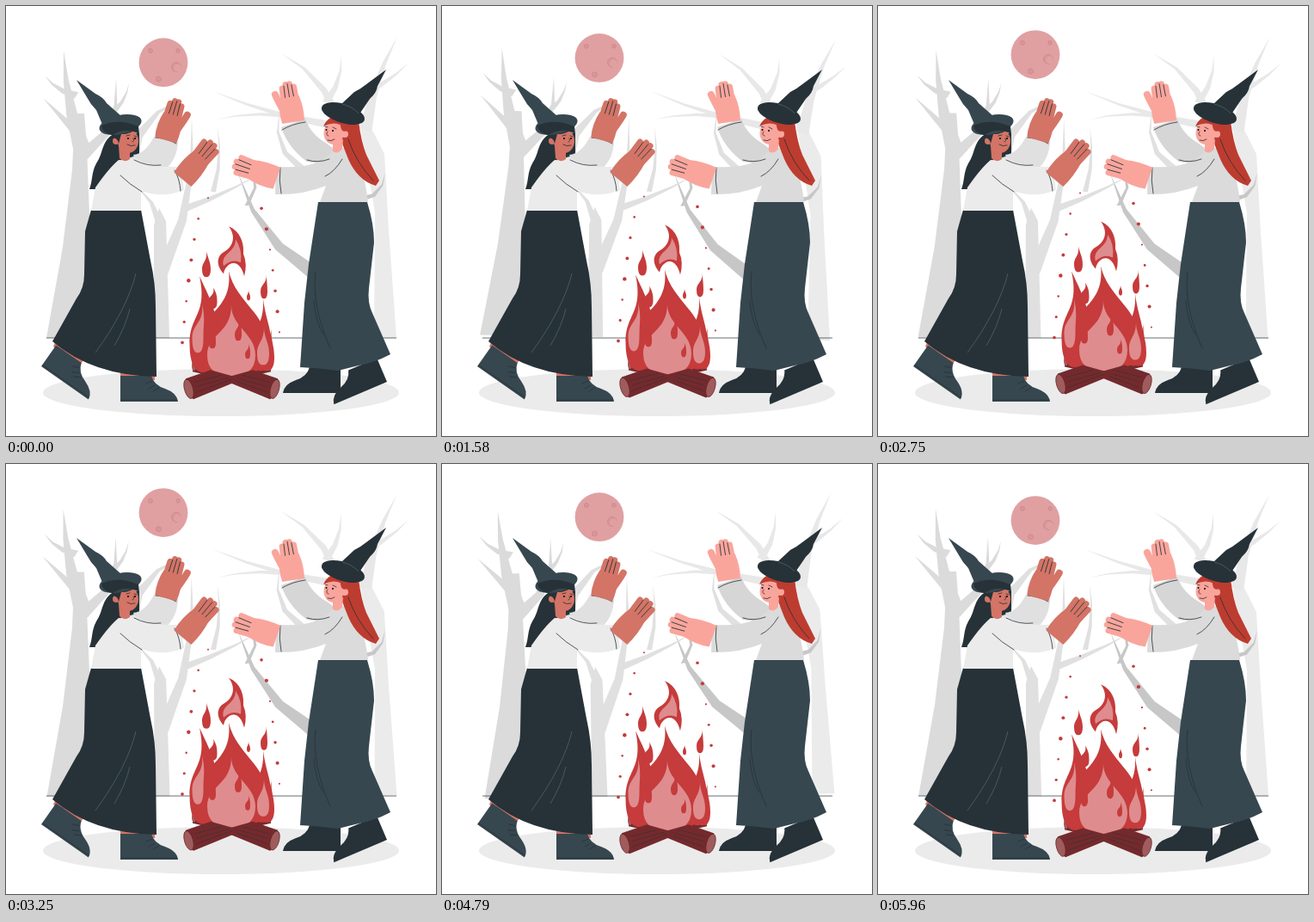
These frames come from a looping animation (500 by 500 pixels, 6000 ms). An HTML page:

```html
<!DOCTYPE html>
<html lang="en">
<head>
<meta charset="utf-8">
<title>Witches at the fire</title>
<style>
html, body { margin: 0; width: 100%; height: 100%; overflow: hidden; background: #fff; }
svg { display: block; width: 100vw; height: 100vh; }
.line { fill: none; stroke: #263238; stroke-width: .8; stroke-linecap: round; }
.soft { fill: none; stroke: #50626b; stroke-width: .8; }
.red { fill: #c63b3b; }
.pink { fill: #df8c8e; }
.wood { fill: #742a2d; }
.hair { fill: #bd3c30; }
.tan { fill: #d37466; }
.peach { fill: #faa59c; }
.night { fill: #263238; }
.slate { fill: #37474f; }
</style>
</head>
<body>
<svg viewBox="0 0 500 500">
  <defs>
    <g id="boot">
      <path d="M0 0V-30H36Q39 -19 52 -15Q66 -10 67 0Z"/>
      <path class="line" d="M37 -24L30 -21M40 -19L33 -15M45 -16L38 -12M1 -2H66"/>
    </g>
    <g id="backLog">
      <path class="wood" d="M217 414Q222 409 229 412L262 427V436L217 426Z"/>
      <ellipse cx="218.5" cy="419" rx="2.5" ry="6" fill="#a05b5d"/>
    </g>
    <g id="log">
      <path class="wood" d="M209 434L238 424L263 431L274 435L218 458Q206 451 209 434Z"/>
      <path class="line" d="M219 438L250 430M222 443L258 433M221 450L262 435" stroke-opacity=".6"/>
      <ellipse cx="212.5" cy="446" rx="5" ry="11.5" transform="rotate(-16 212.5 446)" fill="#a05b5d" stroke="#5c2225" stroke-width=".7"/>
    </g>
  </defs>

  <g id="trees"></g>
  <path d="M47 386H454" stroke="#263238" stroke-width=".7"/>

  <g id="moon" fill="#d99597" stroke="#c98488" stroke-width=".7">
    <circle cx="183" cy="65.7" r="28.4" fill="#e0a0a2" stroke="none"/>
    <circle cx="198" cy="71" r="5.5"/><circle cx="177.5" cy="85" r="3"/>
    <circle cx="200" cy="52" r="2.3"/><circle cx="168" cy="52" r="2.5"/>
    <circle cx="199.5" cy="72" r="4.5" fill="#e0a0a2" stroke="none"/>
  </g>

  <ellipse cx="250" cy="449.5" rx="207" ry="27.5" fill="#ebebeb"/>

  <g id="fire">
    <use href="#backLog"/><use href="#backLog" transform="translate(525) scale(-1 1)"/>
    <g id="flames"></g>
    <path class="red" d="M259 257C273 263 277 277 276 289Q281 301 277 315C274 302 267 297 260 301Q254 305 253 312C244 302 245 292 253 287C264 281 268 269 259 257Z"/>
    <path class="pink" d="M267 272Q275 284 273 299Q263 294 253 303C249 288 267 288 267 272Z"/>
    <use href="#log" transform="translate(525) scale(-1 1)"/><use href="#log"/>
  </g>

  <g id="darkWitch">
    <path class="night" d="M126 148C110 158 114 170 105 183C99 194 101 203 97 213H106C116 206 119 191 131 180L155 173V148Z"/>
    <path class="tan" d="M58 389L90 412L84 420L55 396ZM133 426H173V435H133Z"/>
    <use href="#boot" class="slate" transform="translate(41 419) rotate(35)"/>
    <use href="#boot" class="slate" transform="translate(133 460)"/>
    <path class="night" d="M99 237H157L168 296Q174 322 174 350L175 431Q101 430 54 390L82 340Q91 328 91 312L92 262Z"/>
    <path class="soft" d="M151 311Q141 352 104 403M144 352Q139 373 126 395"/>
    <path fill="#e0e0e0" d="M148 173Q162 172 172 152L200 157Q199 179 185 190L155 192Z"/>
    <path fill="#ebebeb" d="M131 179Q143 181 149 176Q162 188 203 187L207 214Q182 224 157 215V238H99L104 211Q120 188 131 179Z"/>
    <path class="line" d="M133 197Q143 207 158 216M149 179Q164 187 180 185M174 153Q187 154 198 160M196 191Q202 201 203 215"/>
    <path class="tan" d="M131 162L144 167V178Q137 183 132 177Z"/>
    <ellipse class="tan" cx="142" cy="157" rx="12" ry="14"/>
    <circle class="tan" cx="128" cy="157" r="4"/>
    <path class="night" d="M123 153Q130 138 154 142Q142 150 134 149L131 160Q130 153 123 153Z"/>
    <path class="line" d="M140 151L144 150M149 151L152 152M148 154Q150 157 147 158M141 161Q145 164 150 162"/>
    <circle cx="142" cy="154" r="1"/><circle cx="150" cy="154" r="1"/>
    <path class="slate" d="M82 86L104 102Q113 106 117 113L134 128L113 140L105 121Q98 114 94 106Z"/>
    <ellipse class="slate" cx="133" cy="138" rx="25" ry="11" transform="rotate(-12 133 138)"/>
    <path class="night" d="M111 139Q130 130 154 140L155 149Q140 140 124 150Q112 148 111 139Z"/>
  </g>

  <g id="redWitch">
    <use href="#boot" class="night" transform="translate(389 450) scale(-1 1)"/>
    <use href="#boot" class="night" transform="translate(443 437) rotate(-23) scale(-1 1)"/>
    <path class="slate" d="M363 228H420Q428 254 428 275L422 328Q420 345 426 357L447 405Q428 415 410 418L386 424Q364 421 342 420L347 345L352 300Z"/>
    <path class="line" d="M360 309Q355 348 377 398M358 343Q360 368 369 382"/>
    <path fill="#d6d6d6" d="M320 141L348 131Q354 149 373 160L388 171L377 185L350 181Q328 165 320 141Z"/>
    <path fill="#dbdbdb" d="M381 168Q390 161 400 169Q416 184 421 228H365L372 209Q345 220 313 219L314 187Q348 189 367 180Z"/>
    <path class="line" d="M321 144Q333 137 348 135M319 188Q317 203 320 218M391 178Q382 193 371 198M350 179Q363 183 376 178"/>
    <path class="hair" d="M384 128L410 134Q413 158 419 173L434 203L430 209Q409 203 398 178L389 155Z"/>
    <path class="line" d="M398 155Q407 182 427 203"/>
    <path class="peach" d="M380 157L392 155L391 166Q386 173 380 169Z"/>
    <ellipse class="peach" cx="381" cy="148" rx="11.5" ry="13"/>
    <circle class="peach" cx="394" cy="149" r="4"/>
    <path class="hair" d="M369 140Q377 122 402 130L404 147L397 145Q389 148 389 138Q379 134 369 140Z"/>
    <path class="line" d="M371 140L374 141M380 141L384 143M374 146Q371 150 375 151M374 156Q378 158 382 155"/>
    <circle cx="372.5" cy="144" r="1"/><circle cx="380" cy="145" r="1"/>
    <path class="night" d="M442 74L432 93Q431 101 423 108L408 130L380 117L391 113L405 100Q413 96 419 91Z"/>
    <ellipse class="night" cx="392" cy="125" rx="26" ry="11" transform="rotate(17 392 125)"/>
    <path class="soft" d="M391 114Q403 117 410 125"/>
  </g>
</svg>
<script>
const byId = id => document.getElementById(id);
const trees = byId('trees'), moon = byId('moon'), fire = byId('fire'), flames = byId('flames');

function add(parent, tag, attrs) {
  const el = document.createElementNS('http://www.w3.org/2000/svg', tag);
  for (const key in attrs) el.setAttribute(key, attrs[key]);
  parent.append(el);
  return el;
}

// A kinked branch from root to tip, thinning to a point; bend pushes it sideways.
function limb(fill, width, x, y, tipX, tipY, bend) {
  const dx = tipX - x, dy = tipY - y, len = Math.hypot(dx, dy);
  const edge = side => [0, .35, .7, 1].map(t => {
    const off = bend * Math.min(3 * t, 1, 3 * (1 - t)) + side * width / 2 * (1 - t);
    return [x + dx * t - dy / len * off, y + dy * t + dx / len * off];
  });
  add(trees, 'polygon', { fill, points: edge(1).concat(edge(-1).reverse()).join(' ') });
}

const trunk = (fill, d) => add(trees, 'path', { fill, d });
const pale = '#e8e8e8', light = '#e0e0e0', mid = '#dbdbdb', dark = '#c7c7c7';

trunk('#ebebeb', 'M428 386L429 240L407 112L429 150L440 172L445 260L454 386Z');
limb(pale, 15, 418, 145, 455, 36, -5);
limb(pale, 8, 417, 101, 468, 66, 3);
limb(pale, 11, 386, 130, 320, 55, 9);
limb(pale, 9, 372, 112, 390, 58, 5);
limb(pale, 9, 375, 138, 240, 99, -4);
limb(pale, 5, 322, 127, 245, 132, 3);
limb(light, 9, 345, 190, 318, 122, -12);
limb(dark, 17, 360, 312, 270, 195, -14);
limb(dark, 5, 280, 232, 274, 176, 12);
limb(dark, 7, 410, 225, 441, 193, 9);

trunk(light, 'M172 386L172 255L178 235L186 250L190 386Z');
limb(light, 14, 179, 290, 150, 207, 12);
limb(light, 15, 181, 310, 216, 130, 12);
limb(light, 8, 207, 236, 292, 197, 2);
limb(light, 6, 241, 216, 246, 140, 4);
limb(light, 15, 145, 185, 205, 108, -14);

trunk(mid, 'M47 386L66 280L77 190L80 125L91 125L94 165L98 270L93 386Z');
limb(mid, 20, 88, 165, 67, 52, -4);
limb(mid, 9, 82, 104, 45, 81, -4);
limb(mid, 11, 85, 150, 43, 107, 0);
limb(mid, 15, 88, 175, 128, 85, 14);
limb(mid, 6, 126, 122, 143, 90, 3);

// A teardrop flame standing on (x, y) with a tip that leans by bend.
function tongue(kind, x, y, width, tipX, tipY, bend) {
  const h = y - tipY, r = width / 2, belly = y - h * .3;
  add(flames, 'path', {
    class: kind,
    d: `M${tipX} ${tipY}C${tipX + bend} ${tipY + h * .3} ${x + r} ${y - h * .6} ${x + r} ${belly}
      Q${x + r} ${y} ${x} ${y}Q${x - r} ${y} ${x - r} ${belly}
      C${x - r} ${y - h * .6} ${tipX + bend * .6} ${tipY + h * .4} ${tipX} ${tipY}Z`
  });
}

tongue('red', 262, 433, 84, 259, 309, 9);
tongue('red', 230, 427, 33, 225, 315, 16);
tongue('red', 297, 425, 24, 299, 341, 3);
tongue('red', 303, 425, 18, 309, 373, -2);
tongue('pink', 262, 431, 56, 262, 349, 0);
tongue('pink', 223, 404, 13, 228, 347, 4);
tongue('pink', 299, 418, 14, 300, 374, 0);
tongue('red', 270, 390, 8, 270, 366, 4);
tongue('red', 240, 399, 8, 241, 377, 3);
tongue('red', 281, 411, 6, 282, 394, 2);
tongue('red', 233, 316, 10, 233, 286, 2);
tongue('red', 300, 341, 8, 303, 313, 0);
tongue('red', 240, 353, 11, 241, 328, 4);
tongue('red', 282, 343, 4, 282, 331, 0);

// Sparks fall on alternate sides of a column that widens downwards.
for (let i = 0; i < 15; i++) {
  const side = i % 2 ? 1 : -1, vary = i * .618 % 1;
  add(flames, 'circle', {
    class: 'red', r: 1 + 1.3 * vary,
    cx: 262 + side * (27 + 30 * Math.sqrt(i / 14)), cy: 224 + 12 * i
  });
}

// A hand at the wrist (x, y), pointing along angle; thumb is -1, 0 or 1 for its side.
function hand(owner, skin, x, y, angle, len, thumb) {
  const g = add(byId(owner), 'g', {
    transform: `translate(${x} ${y}) rotate(${angle})`, 'stroke-linecap': 'round'
  });
  const color = getComputedStyle(document.querySelector('.' + skin)).fill;
  const gap = thumb ? 4.5 : 6;
  const stroke = (d, width) => add(g, 'path', { d, fill: 'none', stroke: color, 'stroke-width': width });
  add(g, 'path', { class: skin, d: `M-1 -13Q${len * .3} -16 ${len * .6} -11V11Q${len * .3} 15 -1 13Z` });
  for (let i = -1.5; i < 2; i++) stroke(`M${len * .4} ${i * 5}L${len - 4 - i * i * 2} ${i * gap}`, 7);
  for (let i = -1; i < 2; i++) add(g, 'path', { class: 'line', d: `M${len * .6} ${i * 5}L${len * .92 - i * i * 2} ${i * gap}` });
  if (thumb) stroke(`M10 ${thumb * 8}Q26 ${thumb * 14} 34 ${thumb * 16}`, 8);
}

hand('darkWitch', 'tan', 186, 155, -74, 50, 1);
hand('darkWitch', 'tan', 206, 201, -50, 57, 0);
hand('redWitch', 'peach', 334, 134, -99, 48, -1);
hand('redWitch', 'peach', 314, 200, 199, 54, 0);

const LOOP = 6000, FIRE_DELAY = 500;

// Triangle wave: 0 at the start, 1 halfway, back to 0.
function wave(t) {
  const p = (t / LOOP + 1) % 1;
  return 1 - Math.abs(1 - 2 * p);
}

function draw(now) {
  const t = now % LOOP;
  const sway = 2 * wave(t + LOOP / 4) - 1;
  trees.setAttribute('transform', `rotate(${sway} 255 211)`);
  moon.setAttribute('transform', `translate(0 ${-10 * wave(t)})`);
  fire.setAttribute('transform', `translate(0 ${1 - 10 * wave(t - FIRE_DELAY)})`);
  requestAnimationFrame(draw);
}
draw(0);
</script>
</body>
</html>
```
